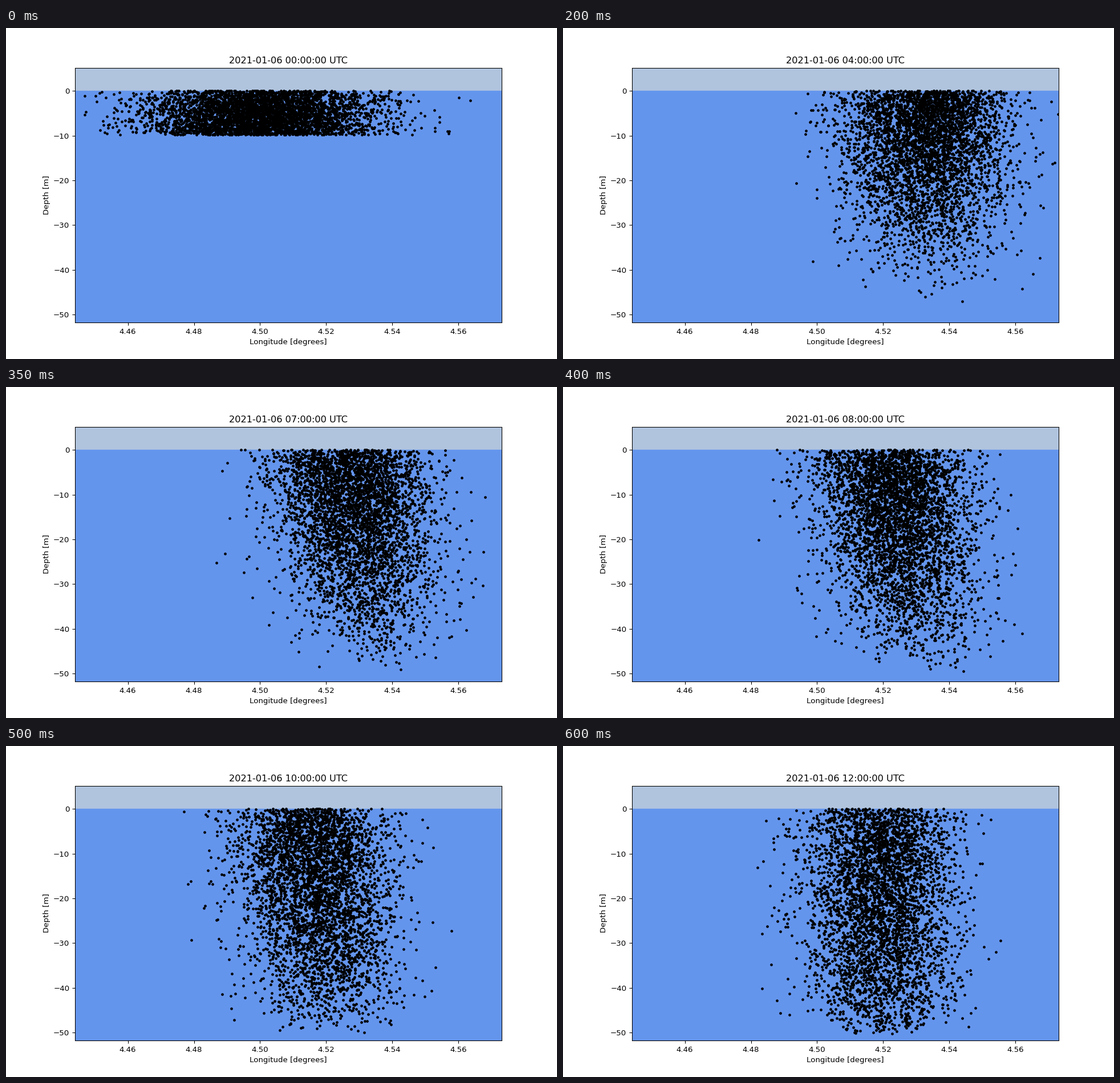
Recreate the animation shown at these times as a matplotlib script. Size 966 by 580 pixels, loop 650 ms.

```python
import matplotlib.pyplot as plt
import numpy as np
from matplotlib.animation import FuncAnimation

HOURS = 13
COUNT = 4300
LON = 4.444, 4.5731
FLOOR = -51.8
SKY = -FLOOR / 10


def wander(rng, state, memory):
    """One step of a random walk that keeps unit variance."""
    return memory * state + np.sqrt(1 - memory**2) * rng.normal(size=state.size)


def depths(h, mixing):
    """Spread the particles over a mixed layer that deepens with time."""
    reach = 50.5 - 40.5 * np.exp(-h / 1.1)
    decay = 3.8 - .19 * h - 2.8 * np.exp(-3 * h)
    rank = (mixing.argsort().argsort() + .5) / COUNT
    return np.maximum(reach * (1 - rank ** (1 / decay)) ** .9 - .15, 0)


def longitudes(h, across, depth):
    """Tidal drift of a narrowing cloud, sheared while the tide turns."""
    tide = .0093 * np.sin(2 * np.pi * (h - 1.7) / 11.4)
    centre = 4.5235 + tide - .016 * np.exp(-h / .9)
    width = .011 + .0063 * np.exp(-h / 2.7)
    shear = .009 / 40 * np.exp(-((h - 8) / 3) ** 2)
    return centre + width * across + shear * depth


def simulate():
    rng = np.random.default_rng(6)
    across, mixing = rng.normal(size=(2, COUNT))
    cloud = []
    for h in range(HOURS):
        depth = depths(h, mixing)
        cloud.append((longitudes(h, across, depth), -depth))
        across = wander(rng, across, .96)
        mixing = wander(rng, mixing, .7)
    return cloud


cloud = simulate()

fig, ax = plt.subplots(figsize=(10, 6.005), dpi=96.6)  # 966 x 580 pixels
ax.axhspan(0, SKY, color="lightsteelblue")
ax.axhspan(FLOOR, 0, color="cornflowerblue")
points, = ax.plot([], [], ".k", markersize=5)
ax.set(xlim=LON, ylim=(FLOOR, SKY),
       xlabel="Longitude [degrees]", ylabel="Depth [m]")
title = ax.set_title("")


def draw(h):
    points.set_data(*cloud[h])
    title.set_text(f"2021-01-06 {h:02d}:00:00 UTC")
    return points, title


anim = FuncAnimation(fig, draw, frames=HOURS, interval=50,
                     repeat=True, repeat_delay=0)
plt.show()
```
